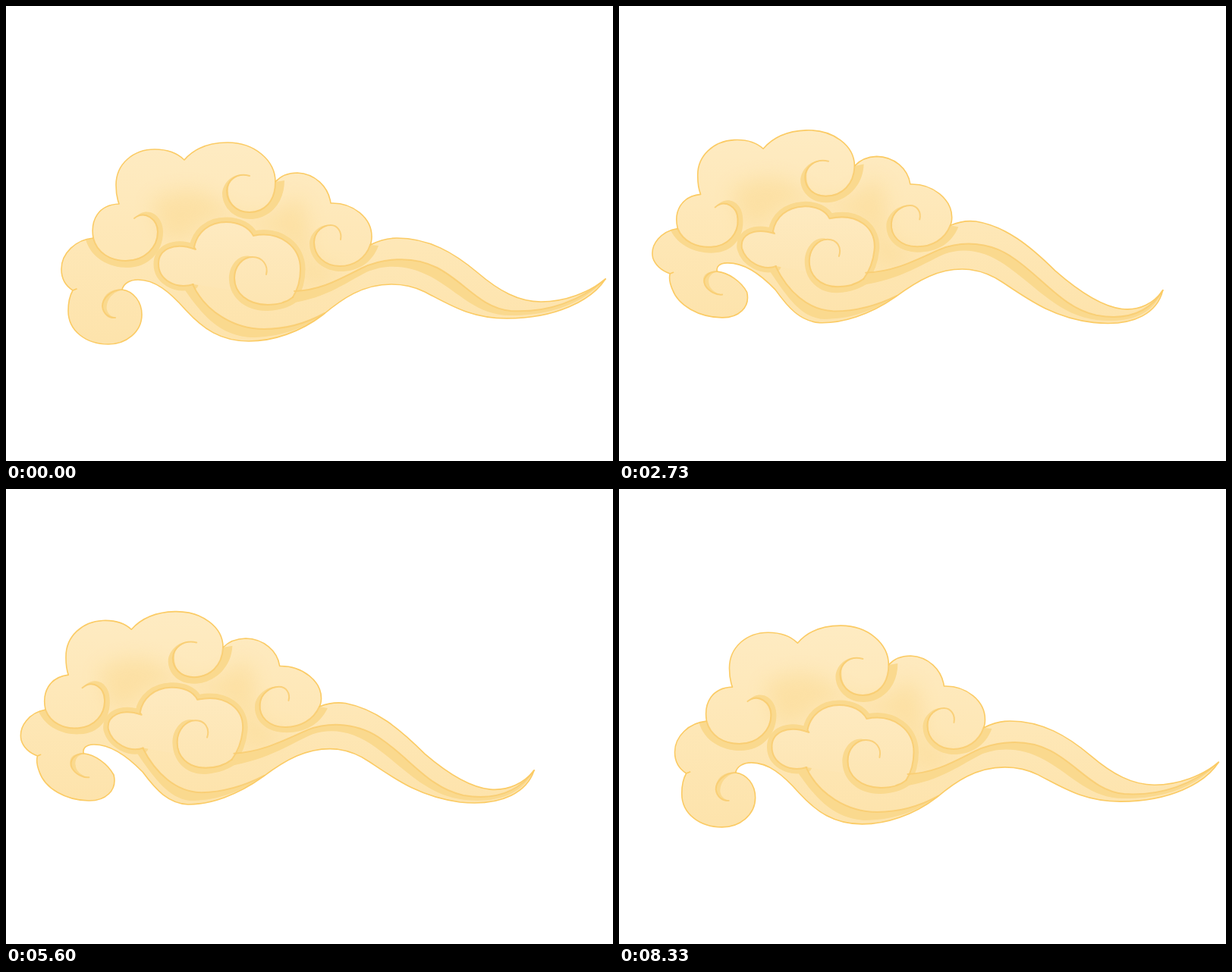
An HTML page that plays this animation: 800x600 px, repeating every 8.41 s.

```html
<!DOCTYPE html>
<html lang="en">
<head>
<meta charset="utf-8">
<title>Drifting cloud</title>
<style>
  html, body { margin: 0; width: 100%; height: 100%; overflow: hidden; background: #fff; }
  svg { display: block; width: 100%; height: 100%; }
  path { stroke-linejoin: round; stroke-linecap: round; }
  .line { fill: none; stroke: #f9cd70; stroke-width: 2; opacity: .85; }
  .shade { fill: #fad98e; }
</style>
</head>
<body>
<svg id="stage" viewBox="0 0 800 600">
  <defs>
    <linearGradient id="body" x1="0" y1="0" x2="0" y2="1">
      <stop offset="0" stop-color="#feebc2"/>
      <stop offset=".4" stop-color="#fee8b9"/>
      <stop offset="1" stop-color="#fde3ab"/>
    </linearGradient>
    <linearGradient id="puff" x1="0" y1="0" x2="0" y2="1">
      <stop offset="0" stop-color="#feeac0"/>
      <stop offset="1" stop-color="#fde5b2"/>
    </linearGradient>
    <filter id="soft" x="-30%" y="-50%" width="160%" height="200%">
      <feGaussianBlur stdDeviation="13"/>
    </filter>
  </defs>
</svg>
<script>
const LOOP = 8410, CYCLE = 126;   // ms, and ticks of 1/30 s
const KEYS = [0, 24, 42, 52, 61, 84, 105];

// Each row is one anchor: its rest place, then its place at the later keys
// (the turn at tick 52 is derived).
const ANCHORS = [
  [73,347, 47,341, 20,331, 17,328, 47,333, 66,344],
  [145,236, 113,229, 79,221, 71,220, 107,225, 134,234],
  [355,232, 323,221, 286,209, 277,204, 314,212, 343,225],
  [481,315, 449,302, 414,287, 406,278, 441,291, 470,306],
  [320,442, 282,431, 240,416, 232,409, 268,419, 305,434],
  [81,402, 61,390, 43,373, 44,366, 71,375, 81,393],
  [179,407, 159,394, 142,377, 145,367, 170,379, 178,398],
  [174,361, 148,350, 115,337, 114,331, 145,340, 168,353],
  [790,360, 746,364, 696,371, 677,377, 722,374, 769,366],
  [683,401, 654,400, 621,405, 606,410, 651,408, 678,402],
  [620,353, 590,350, 550,350, 540,350, 577,350, 608,351],
  [580,392, 548,386, 508,380, 495,375, 540,386, 570,388]
];

// Periodic cubic spline through one value per key.
function track(v) {
  const n = KEYS.length, at = i => (i + n) % n;
  const gap = KEYS.map((k, i) => (i + 1 < n ? KEYS[i + 1] : CYCLE) - k);
  const rise = v.map((a, i) => (v[at(i + 1)] - a) / gap[i]);
  const m = v.map(() => 0);
  for (let pass = 0; pass < 40; pass++)
    for (let i = 0; i < n; i++) {
      const p = at(i - 1), a = gap[p], b = gap[i];
      m[i] = (3 * (b * rise[p] + a * rise[i]) - b * m[p] - a * m[at(i + 1)]) / (2 * (a + b));
    }
  return u => {
    let i = n - 1;
    while (KEYS[i] > u) i--;
    const j = at(i + 1), h = gap[i], s = (u - KEYS[i]) / h, r = 1 - s;
    return v[i] * r * r * (1 + 2 * s) + v[j] * s * s * (1 + 2 * r)
      + h * s * r * (m[i] * r - m[j] * s);
  };
}

const rest = ANCHORS.map(a => [a[0], a[1]]);
const moves = ANCHORS.map(a => [0, 1].map(c => {
  const v = a.filter((_, i) => i % 2 === c).map(p => p - a[c]);
  const pull = c ? -2.5 : a[0] / 200 - 9;
  v.splice(3, 0, (v[2] + v[3]) / 2 + pull);
  return track(v);
}));

// Thin-plate warp
function kernel(x, y, [px, py]) {
  const q = ((x - px) ** 2 + (y - py) ** 2) / 1e4;
  return q ? q * Math.log(q) : 0;
}
const basis = (x, y) => [...rest.map(p => kernel(x, y, p)), 1, x / 100, y / 100];

function solve(rows) {
  const n = rows.length;
  for (let c = 0; c < n; c++) {
    let best = c;
    for (let r = c + 1; r < n; r++)
      if (Math.abs(rows[r][c]) > Math.abs(rows[best][c])) best = r;
    [rows[c], rows[best]] = [rows[best], rows[c]];
    for (let r = 0; r < n; r++) {
      if (r === c) continue;
      const f = rows[r][c] / rows[c][c];
      for (let k = c; k < n + 2; k++) rows[r][k] -= f * rows[c][k];
    }
  }
  return rows.map((r, i) => [r[n] / r[i], r[n + 1] / r[i]]);
}

function warpAt(u) {
  const rows = rest.map(([x, y], i) => [...basis(x, y), ...moves[i].map(f => f(u))]);
  for (let k = 0; k < 3; k++)
    rows.push([...rest.map(([x, y]) => [1, x / 100, y / 100][k]), 0, 0, 0, 0, 0]);
  const w = solve(rows);
  return (x, y) => {
    let dx = 0, dy = 0;
    basis(x, y).forEach((b, i) => { dx += b * w[i][0]; dy += b * w[i][1]; });
    return [x + dx, y + dy];
  };
}

const OUTLINE = `M93,373 L88,375 C77,368 73,358 73,347 C73,326 92,308 115,306
  C111,282 122,262 149,261 C146,253 145,245 145,236 C145,208 168,189 196,189
  C212,189 226,194 235,203 C248,188 268,180 292,180 C328,180 355,204 355,232
  C362,224 373,220 384,220 C407,221 425,238 428,260 C458,259 482,280 482,304
  C482,308 482,311 480,315 C492,309 503,306 515,306 C557,306 590,325 622,352
  C650,376 676,390 705,390 C737,390 768,378 790,360 C772,388 725,412 660,412
  C612,412 585,394 552,377 C538,370 522,367 508,367 C470,367 443,386 418,407
  C388,430 352,442 320,442 C283,442 260,426 237,401 C215,376 196,361 174,361
  C163,361 155,366 153,374 C168,376 179,390 179,407 C179,430 158,446 135,446
  C105,446 82,428 82,402 C82,392 84,382 88,375`;
const PUFF = `M247,367 C222,374 201,360 201,340 C201,322 220,310 250,321 L248,318
  C252,298 268,285 290,285 C307,285 320,292 326,303 C362,296 388,318 388,347
  C388,362 385,373 378,384`;
const HOLLOW = `M190,258 C230,235 260,240 285,262 C320,290 360,280 378,250
  C400,262 400,290 398,315 C400,345 440,355 455,346 C430,365 400,372 390,368
  C395,320 350,290 325,295 C300,270 255,280 240,308 C215,305 205,320 205,300 Z`;
const RIBBON_LINE = `M380,376 C415,375 440,360 468,346 C495,333 535,328 568,345
  C605,364 625,398 665,402 C715,405 758,388 790,360`;
const RIBBON_SHADE = RIBBON_LINE + ` C760,394 715,408 665,408
  C620,408 598,378 560,357 C530,341 500,340 475,351 C445,366 420,388 360,394 Z`;
const KEEL = `M232,369 L246,367 C262,402 300,426 340,426 C372,426 400,416 420,405
  C392,427 358,437 322,437 C285,434 262,414 232,369 Z`;

// Swirls: the curl line, and the shade lying outside it
const SWIRLS = [
  [`M355,232 C355,258 340,272 321,272 C302,272 291,258 291,244 C291,231 303,219 321,224`,
   `M355,232 C355,258 340,271 321,271 C302,271 293,258 293,244 C292,231 304,220 321,224
    C300,217 286,233 285,247 C285,264 299,281 322,281 C345,281 367,262 367,230 Z`],
  [`M115,306 C120,326 138,336 158,336 C183,336 200,318 200,298 C200,281 183,269 169,280`,
   `M115,306 C120,326 138,335 158,335 C183,335 199,318 199,298 C199,282 183,270 169,280
    C185,262 207,275 207,298 C207,325 187,345 160,345 C135,345 112,332 105,308 Z`],
  [`M480,315 C474,333 458,343 440,343 C420,343 406,329 406,312 C406,297 418,289 428,289
    C437,289 443,298 441,308`,
   `M480,315 C474,333 458,343 440,343 C420,343 407,329 407,312 C407,298 418,290 428,289
    C415,287 401,298 400,313 C400,332 415,348 438,350 C462,351 482,340 491,316 Z`],
  [`M378,384 C370,391 358,394 345,394 C318,394 301,378 301,359 C301,343 312,331 325,331
    C338,331 346,342 343,354`,
   `M380,384 C370,391 358,393 345,393 C318,393 302,378 302,359 C302,343 312,332 325,331
    C308,324 293,342 294,361 C295,386 318,403 345,402 C364,401 376,396 386,388 Z`],
  [`M153,374 C138,374 127,386 127,396 C128,406 136,412 144,411`,
   `M154,374 C135,372 126,384 127,397 C129,407 136,412 144,411
    C136,409 131,402 133,394 C135,383 144,376 154,374 Z`]
];

const stage = document.getElementById('stage');
const parts = [];
function add(d, attrs) {
  const el = document.createElementNS('http://www.w3.org/2000/svg', 'path');
  for (const k in attrs) el.setAttribute(k, attrs[k]);
  stage.appendChild(el);
  parts.push({ el, d });
}
const shade = d => add(d, { class: 'shade' });
const line = d => add(d, { class: 'line' });

add(OUTLINE, { fill: 'url(#body)' });
add(HOLLOW, { fill: '#fad78a', opacity: .45, filter: 'url(#soft)' });
SWIRLS.slice(0, 3).forEach(s => shade(s[1]));
shade(RIBBON_SHADE);
shade(KEEL);
add(PUFF, { fill: 'none', stroke: '#fad98e', 'stroke-width': 13 });
add(PUFF + ' C360,396 318,394 301,375 Z', { fill: 'url(#puff)' });
SWIRLS.slice(3).forEach(s => shade(s[1]));
line(PUFF);
line(RIBBON_LINE);
line('M246,367 C262,402 300,426 340,426 C372,426 400,416 420,405');
SWIRLS.forEach(s => line(s[0]));
add(OUTLINE, { fill: 'none', stroke: '#fbcb64', 'stroke-width': 1.6 });

// Poses hold for two ticks, the first of every 21 for three.
function heldTick(ms) {
  const u = Math.floor((ms + 4) * .03), r = u % 21;
  return u - r + (r < 3 ? 0 : r - (r + 1) % 2);
}

function draw(u) {
  const warp = warpAt(u % CYCLE);
  for (const { el, d } of parts)
    el.setAttribute('d', d.replace(/([\d.]+),([\d.]+)/g,
      (_, x, y) => warp(+x, +y).map(n => n.toFixed(2)).join(',')));
}

let shown = -1;
function frame() {
  const u = heldTick(performance.now() % LOOP);
  if (u !== shown) draw(shown = u);
  requestAnimationFrame(frame);
}
frame();
</script>
</body>
</html>
```
